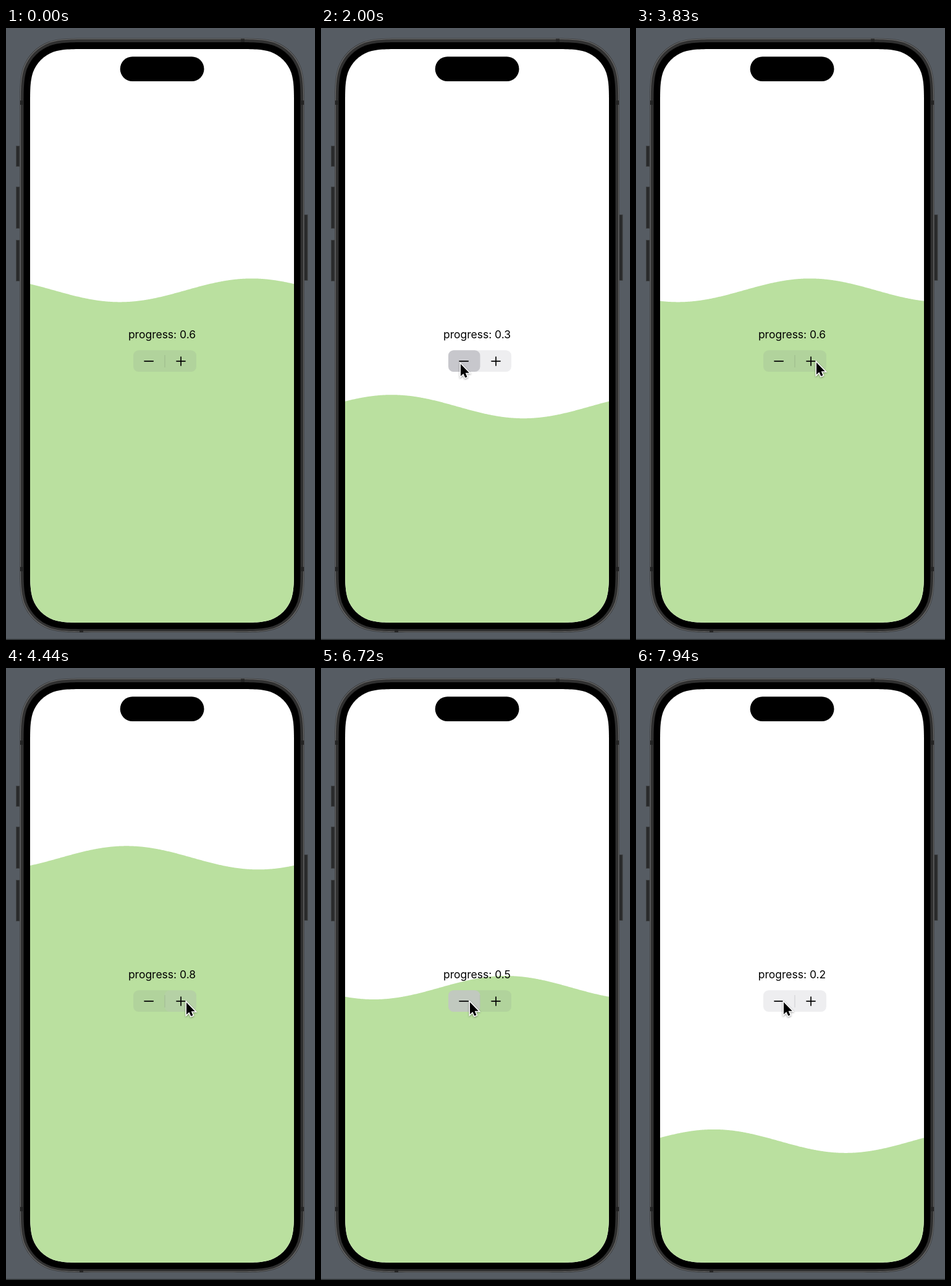
Recreate the animation shown at these times as an HTML page with a canvas. Size 500 by 988 pixels, loop 8000 ms.

```html
<!DOCTYPE html>
<html lang="en">
<head>
<meta charset="utf-8">
<title>Wave progress</title>
<style>
  html, body { margin: 0; width: 100%; height: 100%; overflow: hidden; background: #565c63; }
  canvas { display: block; width: 500px; height: 988px; }
</style>
</head>
<body>
<canvas id="stage" width="500" height="988"></canvas>
<script>
const ctx = document.getElementById('stage').getContext('2d');

const LOOP = 8000, FRAME = 1000 / 18;
const SCREEN = { x: 39, y: 34, w: 427, h: 926 };
const WAVE = { amplitude: 19, period: 3013, trough: 0.34 };
const STEP_TIME = 120, PRESS_TIME = 90;

// Moments at which the stepper is released, with the change each one makes.
const taps = [
  [1680, -1], [1830, -1], [1988, -1],
  [2900, 1], [3257, 1], [3700, 1], [4180, 1], [4404, 1],
  [5050, -1], [5330, -1], [6430, -1], [6790, -1], [7500, -1], [7870, -1]
].map(([time, sign]) => ({ time, sign }));

// Pointer tip: time, x, y
const pointerKeys = [
  [600, 292, 930], [830, 231, 550], [1100, 226, 542.5], [2500, 226, 542.5],
  [2750, 292, 540], [4650, 292, 540], [4950, 247, 547.5], [5080, 241, 539.5],
  [7000, 241, 539.5], [7400, 239, 539.5]
];

const clamp = v => Math.min(1, Math.max(0, v));
const ease = v => { const u = clamp(v); return u * u * (3 - 2 * u); };

function fillRect(color, x, y, w, h) {
  ctx.fillStyle = color;
  ctx.fillRect(x, y, w, h);
}

function fillRound(color, x, y, w, h, r) {
  ctx.fillStyle = color;
  ctx.beginPath();
  ctx.roundRect(x, y, w, h, r);
  ctx.fill();
}

// Rounded rectangle whose corners ease into the straight sides.
function smoothRect(x, y, w, h, r) {
  const path = new Path2D();
  const corners = [
    [x + w, y, -1, 0, 0, 1], [x + w, y + h, 0, -1, -1, 0],
    [x, y + h, 1, 0, 0, -1], [x, y, 0, 1, 1, 0]
  ];
  corners.forEach(([cx, cy, ax, ay, bx, by], i) => {
    const at = (a, b) => [cx + r * (a * ax + b * bx), cy + r * (a * ay + b * by)];
    const curve = (p, q, s) => path.bezierCurveTo(...at(...p), ...at(...q), ...at(...s));
    path[i ? 'lineTo' : 'moveTo'](...at(1.5287, 0));
    curve([1.0885, 0], [0.8684, 0], [0.6315, 0.0749]);
    curve([0.3728, 0.1691], [0.1691, 0.3728], [0.0749, 0.6315]);
    curve([0, 0.8684], [0, 1.0885], [0, 1.5287]);
  });
  path.closePath();
  return path;
}

const screenShape = smoothRect(SCREEN.x, SCREEN.y, SCREEN.w, SCREEN.h, 60);
const bodyLayers = [
  ['#3a3c3e', smoothRect(22, 16.5, 461, 959.5, 75)],
  ['#707070', smoothRect(22.8, 17.3, 459.4, 957.9, 74.5)],
  ['#303030', smoothRect(23.8, 18.3, 457.4, 955.9, 74)],
  ['#000', smoothRect(28.5, 23, 448, 947.5, 69)],
  ['#fff', screenShape]
];

function drawPhone() {
  fillRect('#565c63', 0, 0, 500, 988);
  fillRect('#2b2e31', 0, 986.5, 500, 1.5);
  for (const [x, y, h] of [[16, 190, 34], [16, 256, 68], [16, 342, 67], [482, 301, 107]]) {
    fillRect('#404244', x, y, 6.5, h);
    fillRect('#292a2b', x + 1, y + 1, 4.5, h - 2);
  }
  for (const [color, shape] of bodyLayers) {
    ctx.fillStyle = color;
    ctx.fill(shape);
  }
  for (const y of [117, 870]) {
    fillRect('#242424', 23, y, 5.5, 7);
    fillRect('#242424', 476.5, y, 5.5, 7);
  }
  fillRect('#242424', 380, 17.5, 6, 5.5);
  fillRect('#242424', 119, 970.5, 6, 5);
}

function drawWave(progress, t) {
  const { x, y, w, h } = SCREEN;
  const middle = y + (1 - progress) * h + WAVE.amplitude;
  const trough = WAVE.trough - t / WAVE.period;
  ctx.save();
  ctx.clip(screenShape);
  ctx.beginPath();
  ctx.moveTo(x, y + h);
  for (let i = 0; i <= w; i++) {
    ctx.lineTo(x + i, middle + WAVE.amplitude * Math.cos(2 * Math.PI * (i / w - trough)));
  }
  ctx.lineTo(x + w, y + h);
  ctx.fillStyle = '#bae09f';
  ctx.fill();
  ctx.restore();
}

function drawStepper(press) {
  const minus = press(-1), plus = press(1);
  fillRound('rgba(118,118,128,.12)', 206, 520.3, 102, 34.8, 8.7);
  for (const [x, alpha] of [[206, minus], [256.5, plus]]) {
    if (alpha > 0) fillRound(`rgba(199,199,204,${alpha})`, x, 520.3, 51.5, 34.8, 8.7);
  }
  fillRect(`rgba(60,60,67,${0.18 * (1 - Math.max(minus, plus))})`, 256.5, 528, 1, 20);
  fillRound('#000', 223.2, 537.1, 15.8, 1.7, 0.8);
  fillRound('#000', 275.2, 537.1, 15.6, 1.7, 0.8);
  fillRound('#000', 282.2, 530.2, 1.7, 15.6, 0.8);
}

function drawPointer(t) {
  if (t < pointerKeys[0][0]) return;
  let next = pointerKeys.findIndex(key => key[0] > t);
  if (next < 0) next = pointerKeys.length - 1;
  const [t0, x0, y0] = pointerKeys[next - 1], [t1, x1, y1] = pointerKeys[next];
  const u = ease((t - t0) / (t1 - t0));
  const arrow = [[0, 0], [0, 19.5], [4.4, 15.4], [7.3, 22], [10.5, 20.7], [7.7, 14.2], [13.8, 14.2]];
  ctx.save();
  ctx.translate(x0 + (x1 - x0) * u, y0 + (y1 - y0) * u);
  ctx.beginPath();
  arrow.forEach(point => ctx.lineTo(...point));
  ctx.closePath();
  ctx.shadowColor = 'rgba(0,0,0,.4)';
  ctx.shadowBlur = 3;
  ctx.shadowOffsetY = 1;
  ctx.strokeStyle = '#fff';
  ctx.lineWidth = 3;
  ctx.stroke();
  ctx.shadowColor = 'transparent';
  ctx.fillStyle = '#000';
  ctx.fill();
  ctx.restore();
}

function draw(t) {
  let value = 6, level = 6;
  for (const { time, sign } of taps) {
    if (t >= time) value += sign;
    level += sign * ease((t - time) / STEP_TIME);
  }
  // The pressed half fades in quickly and out just after its release.
  const press = side => Math.max(...taps.filter(tap => tap.sign === side).map(({ time }) =>
    Math.min(clamp((t - time + PRESS_TIME) / 30), clamp((time + 45 - t) / 25))));

  drawPhone();
  drawWave(level / 10, t);
  fillRound('#000', 184.7, 46.3, 135.8, 39.7, 19.85);
  ctx.font = '17.5px Inter, sans-serif';
  ctx.textAlign = 'center';
  ctx.fillStyle = '#000';
  ctx.fillText(`progress: 0.${value}`, 252.5, 501);
  drawStepper(press);
  drawPointer(t);
}

function tick() {
  const t = performance.now() % LOOP;
  draw(Math.floor((t + 5) / FRAME) % 144 * FRAME);
  requestAnimationFrame(tick);
}
tick();
</script>
</body>
</html>
```
